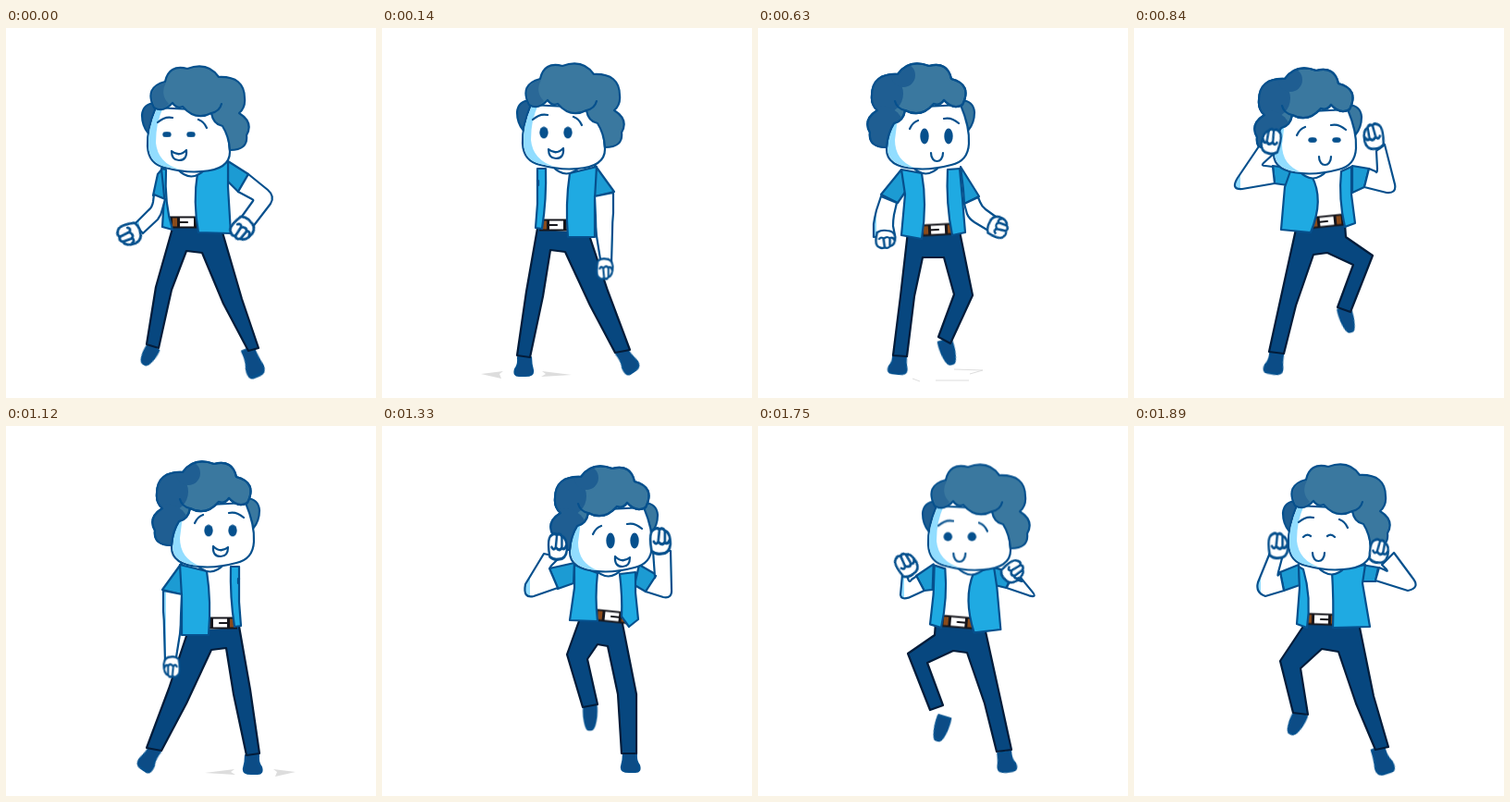
These frames come from a looping animation (400x400 px, 1960 ms). An HTML page without scripts:

```html
<!DOCTYPE html>
<html lang="en">
<head>
<meta charset="utf-8">
<title>Dancer</title>
<style>
html, body { margin: 0; width: 100%; height: 100%; overflow: hidden; background: #fff }
svg { display: block; width: 100vw; height: 100vh }
.line { fill: none; stroke: #06508d; stroke-width: 2.2; stroke-linecap: round; stroke-linejoin: round }
.ink { fill: #06508d }
.skin { fill: #fff }
.shade { fill: #92ddff }
.hair { fill: #3a789f }
.dark { fill: #1f5e92 }
.shirt { fill: #1faae2 }
.sleeve { fill: #1c9bd3 }
.trousers { fill: #07477f; stroke: #031c3a }
.shoe {
  fill: #0c4c86;
  --flat: path("M-7-1H7Q7 7 9 13Q10 19 1 19H-6Q-12 19-10 12Q-6 7-7-1Z");
  --tip: path("M-8-1H8Q9 7 7 13Q5 20 2 20H-1Q-5 20-7 13Q-9 7-8-1Z");
}
.dust { fill: #ddd }

/* One half of the dance, shown again as its mirror image. */
.half { animation: 980ms steps(1) infinite }
.full { animation: 1960ms steps(1) infinite }

.flip { animation-name: flip }
.unflip { animation-name: unflip }
.lookLeft { animation-name: lookLeft }
.lookRight { animation-name: lookRight }
@keyframes flip { 0% { transform: translate(0) scaleX(1) } 50%, to { transform: translate(420px) scaleX(-1) } }
@keyframes unflip { 0% { transform: scaleX(1) } 50%, to { transform: scaleX(-1) } }
@keyframes lookLeft { 0%, 75%, to { opacity: 1 } 25% { opacity: 0 } }
@keyframes lookRight { 0%, 75%, to { opacity: 0 } 25% { opacity: 1 } }
@keyframes litA { 0% { fill: url(#litA) } 50%, to { fill: #fff } }
@keyframes litB { 0% { fill: #fff } 50%, to { fill: url(#litB) } }

.trousers { animation-name: trousers }
@keyframes trousers {
0%, to { d: path("M181 213 162 280 152 342 165 346 179 283 195 241 212 243 235 298 262 349 273 346 255 293 232 214Z"); animation-timing-function: steps(2) }
14.285% { d: path("M169 211 156 285 146 354 160 356 174 290 182 240 198 242 225 300 252 351 268 348 244 284 223 221Z"); animation-timing-function: steps(3) }
35.714% { d: path("M161 209 145 290 145 354 161 354 165 290 176 238 187 236 198 252 187 301 203 304 220 247 206 208Z"); animation-timing-function: steps(3) }
57.142% { d: path("M152 221 143 303 146 353 161 354 162 300 169 246 196 246 191 290 182 346 198 350 210 284 212 218Z") }
64.285% { d: path("M162 220 154 290 146 354 161 355 169 290 178 248 201 248 212 288 195 334 208 341 232 289 218 220Z"); animation-timing-function: steps(3) }
85.714% { d: path("M176 213 158 295 146 350 162 352 175 300 194 245 209 243 237 256 220 302 234 307 258 246 229 226 228 212Z") }
92.857% { d: path("M177 213 161 292 145 347 159 350 180 300 199 244 217 241 240 262 232 312 248 310 262 254 234 212Z") }
}
.shoeA { animation-name: shoeA }
@keyframes shoeA {
0%, to { d: var(--tip); transform: translate(159px, 346px) rotate(30deg) scale(.85, 1); animation-timing-function: steps(2) }
14.285% { d: var(--flat); transform: translate(154px, 357px) rotate(0deg); animation-timing-function: steps(3) }
35.714% { transform: translate(152px, 355px) rotate(0deg); animation-timing-function: steps(3) }
57.142% { transform: translate(154px, 355px) rotate(0deg) scaleY(1.15) }
64.285% { transform: translate(153px, 355px) rotate(6deg); animation-timing-function: steps(3) }
85.714% { transform: translate(154px, 353px) rotate(10deg) scaleY(1.1) }
92.857% { d: var(--flat); transform: translate(156px, 350px) rotate(18deg) scaleY(1.4) }
}
.shoeB { animation-name: shoeB }
@keyframes shoeB {
0%, to { d: var(--flat); transform: translate(262px, 349px) rotate(-22deg) scale(.95, 1.5); animation-timing-function: steps(2) }
14.285% { d: var(--flat); transform: translate(259px, 350px) rotate(-34deg) scale(.9, 1.3); animation-timing-function: steps(3) }
35.714% { d: var(--tip); transform: translate(195px, 303px) rotate(0deg) scale(.85, 1.25); animation-timing-function: steps(3) }
57.142% { d: var(--flat); transform: translate(189px, 350px) rotate(0deg) scaleY(1.1) }
64.285% { d: var(--tip); transform: translate(202px, 339px) rotate(-17deg) scale(.9, 1.25); animation-timing-function: steps(3) }
85.714% { d: var(--tip); transform: translate(227px, 304px) rotate(-17deg) scale(.85, 1.25) }
92.857% { d: var(--tip); transform: translate(240px, 312px) rotate(-27deg) scale(.9, 1.15) }
}
.torso { animation-name: torso }
@keyframes torso {
0%, to { d: path("M171 150 180 216 209 216 238 148Z"); animation-timing-function: steps(2) }
14.285% { d: path("M170 150 172 218 203 220 230 150Z"); animation-timing-function: steps(3) }
35.714% { d: path("M147 155 160 205 188 208 212 152Z"); animation-timing-function: steps(3) }
57.142% { d: path("M147 152 170 222 200 222 212 152Z") }
64.285% { d: path("M156 153 176 222 212 220 220 152Z"); animation-timing-function: steps(3) }
85.714% { d: path("M170 152 190 215 226 212 236 150Z") }
92.857% { d: path("M171 150 204 212 234 214 242 150Z") }
}
.belt { animation-name: belt }
@keyframes belt {
0%, to { transform: translate(195px, 210px); animation-timing-function: steps(2) }
14.285% { transform: translate(188px, 213px); animation-timing-function: steps(3) }
35.714% { transform: translate(171px, 206px) rotate(-6deg); animation-timing-function: steps(3) }
57.142% { transform: translate(184px, 218px) }
64.285% { transform: translate(194px, 218px) rotate(-3deg); animation-timing-function: steps(3) }
85.714% { transform: translate(208px, 209px) rotate(-6deg) }
92.857% { transform: translate(217px, 209px) rotate(-2deg) }
}
.panelA { animation-name: panelA }
@keyframes panelA {
0%, to { d: path("M173 153Q171 190 180 218L169 215 171 182 168 152Z"); animation-timing-function: steps(2) }
14.285% { d: path("M177 152Q178 185 173 217L166 216 168 190 168 152Z"); animation-timing-function: steps(3) }
35.714% { d: path("M163 160Q160 185 161 206L153 217 143 209 146 180 146 158Z"); animation-timing-function: steps(3) }
57.142% { d: path("M167 155Q169 195 173 228L147 228 147 195 146 152Z") }
64.285% { d: path("M177 157Q183 190 177 228L155 224 159 180 155 153Z"); animation-timing-function: steps(3) }
85.714% { d: path("M192 160Q206 185 191 221L159 218 163 172 170 152Z") }
92.857% { d: path("M206 157Q204 190 205 218L165 217 173 170 170 150Z") }
}
.panelB { animation-name: panelB }
@keyframes panelB {
0%, to { d: path("M207 157Q202 188 208 221L243 222 240 172 240 144Z"); animation-timing-function: steps(2) }
14.285% { d: path("M203 157Q198 190 201 226L230 226 230 185 232 150Z"); animation-timing-function: steps(3) }
35.714% { d: path("M187 159Q190 185 187 211L217 210 212 175 212 150Z"); animation-timing-function: steps(3) }
57.142% { d: path("M195 152Q194 190 198 224L216 222 214 195 211 152Z") }
64.285% { d: path("M205 153Q203 190 210 224L224 221 221 185 218 152Z"); animation-timing-function: steps(3) }
85.714% { d: path("M224 155Q221 185 228 215L239 211 235 180 235 150Z") }
92.857% { d: path("M237 155Q228 185 233 218L244 214 241 175 242 152Z") }
}
.sleeveA { animation-name: sleeveA }
@keyframes sleeveA {
0%, to { d: path("M170 151 164 158 159 181 172 185Z"); animation-timing-function: steps(2) }
14.285% { d: path("M170 155 168 165 169 180 170 185Z"); animation-timing-function: steps(3) }
35.714% { d: path("M142 150 123 161 135 179 147 172Z"); animation-timing-function: steps(3) }
57.142% { d: path("M146 150 133 190 146 195 147 170Z") }
64.285% { d: path("M155 153 133 180 151 189 160 176Z"); animation-timing-function: steps(3) }
85.714% { d: path("M172 152 150 149 152 168 166 170Z") }
92.857% { d: path("M174 150 156 153 159 168 173 168Z") }
}
.sleeveB { animation-name: sleeveB }
@keyframes sleeveB {
0%, to { d: path("M240 144 262 158 251 177 240 166Z"); animation-timing-function: steps(2) }
14.285% { d: path("M230 148 251 177 230 182 229 160Z"); animation-timing-function: steps(3) }
35.714% { d: path("M212 148 239 154 230 176 213 170Z"); animation-timing-function: steps(3) }
57.142% { d: path("M212 152 231 188 217 196 214 170Z") }
64.285% { d: path("M219 150 239 182 223 190 222 175Z"); animation-timing-function: steps(3) }
85.714% { d: path("M236 149 254 152 249 172 236 178Z") }
92.857% { d: path("M242 150 262 158 258 178 241 172Z") }
}
.armA { animation: armA 980ms steps(1) infinite, litA 1960ms steps(1) infinite }
@keyframes armA {
0%, to { d: path("M160 180L159 188Q158 194 154 197L139 212 148 222 164 207Q168 202 169 196L172 185Z"); animation-timing-function: steps(2) }
14.285% { d: path("M169 165L169 167Q169 168 169 169L169 170 169 170 169 169Q169 168 169 167L169 166Z"); animation-timing-function: steps(3) }
35.714% { d: path("M124 162L125 164Q125 165 125 163L127 135 108 135 107 176Q106 187 116 185L135 179Z") }
42.857% { d: path("M125 165L121 166Q119 166 117 164L107 154 93 162 104 178Q108 187 116 186L135 182Z"); animation-timing-function: steps(2) }
57.142% { d: path("M134 191L133 206Q132 222 131 236L129 256 144 252 145 230Q145 214 145 208L146 196Z") }
64.285% { d: path("M133 182L128 197Q126 205 125 212L125 226 148 224 146 214Q146 208 147 202L150 189Z"); animation-timing-function: steps(3) }
85.714% { d: path("M150 150L142 149Q137 149 140 146L152 135 135 128 112 162Q104 175 117 174L152 168Z") }
92.857% { d: path("M155 153L148 156Q145 158 147 155L152 150 139 137 119 164Q110 175 124 178L159 167Z") }
}
.armB { animation: armB 980ms steps(1) infinite, litB 1960ms steps(1) infinite }
@keyframes armB {
0%, to { d: path("M262 158L283 175Q291 182 286 190L266 216 254 205 267 187Q268 186 266 185L251 177Z"); animation-timing-function: steps(2) }
14.285% { d: path("M250 178L250 200Q249 210 249 220L248 255 236 250 232 225Q231 215 231 205L230 182Z"); animation-timing-function: steps(3) }
35.714% { d: path("M239 154L239 154Q238 153 237 151L228 142 245 138 265 171Q268 187 256 184L230 175Z"); animation-timing-function: steps(3) }
57.142% { d: path("M231 189L234 205Q235 215 235 222L232 252 216 250 219 226Q219 218 218 210L217 196Z") }
64.285% { d: path("M238 183L240 188Q242 193 246 196L257 204 249 219 234 210Q228 206 226 201L223 190Z"); animation-timing-function: steps(3) }
85.714% { d: path("M254 152L261 155Q263 158 263 152L262 133 271 126 282 169Q284 179 273 178L249 172Z") }
92.857% { d: path("M262 158L264 161Q265 163 264 158L260 143 273 137 286 169Q289 180 278 184L258 178Z") }
}
.fistA { animation-name: fistA }
@keyframes fistA {
0%, to { transform: translate(134px, 223px) rotate(70deg) scale(1.25); animation-timing-function: steps(2) }
14.285% { transform: translate(169px, 180px) rotate(90deg) scale(0); animation-timing-function: steps(3) }
35.714% { transform: translate(119px, 125px) rotate(180deg) scale(1.2, 1.45) }
42.857% { transform: translate(98px, 151px) rotate(130deg) scale(1.1); animation-timing-function: steps(2) }
57.142% { transform: translate(137px, 263px) rotate(0deg) scale(1, 1.15) }
64.285% { transform: translate(138px, 228px) rotate(0deg) scale(1.15, 1); animation-timing-function: steps(3) }
85.714% { transform: translate(148px, 123px) rotate(190deg) scale(1.1, 1.4) }
92.857% { transform: translate(155px, 136px) rotate(170deg) scale(1.1, 1.3) }
}
.fistB { animation-name: fistB }
@keyframes fistB {
0%, to { transform: translate(256px, 217px) rotate(40deg) scale(1.25); animation-timing-function: steps(2) }
14.285% { transform: translate(241px, 260px) rotate(0deg) scale(.95, 1.15); animation-timing-function: steps(3) }
35.714% { transform: translate(230px, 131px) rotate(-180deg) scale(1.1, 1.45); animation-timing-function: steps(3) }
57.142% { transform: translate(223px, 259px) rotate(0deg) scale(1, 1.15) }
64.285% { transform: translate(259px, 215px) rotate(-70deg) scale(1.2, 1.1); animation-timing-function: steps(3) }
85.714% { transform: translate(259px, 118px) rotate(-190deg) scale(1.15, 1.4) }
92.857% { transform: translate(264px, 130px) rotate(-180deg) scale(1.15, 1.4) }
}
.head { animation-name: head }
@keyframes head {
0%, to { transform: translate(200px, 110px); animation-timing-function: steps(2) }
14.285% { transform: translate(199px, 107px); animation-timing-function: steps(3) }
35.714% { transform: translate(175px, 112px); animation-timing-function: steps(3) }
57.142% { transform: translate(179px, 106px) }
64.285% { transform: translate(181px, 107px); animation-timing-function: steps(3) }
85.714% { transform: translate(193px, 112px) }
92.857% { transform: translate(206px, 110px) }
}
.features { animation-name: features }
@keyframes features {
0%, to { transform: translate(-13px, 5px); animation-timing-function: steps(2) }
14.285% { transform: translate(-11px, 6px); animation-timing-function: steps(3) }
35.714% { transform: translate(-15px, 12px); animation-timing-function: steps(3) }
57.142% { transform: translate(-6px, 6px) }
64.285% { transform: translate(12px, 10px); animation-timing-function: steps(3) }
85.714% { transform: translate(13px, 9px) }
92.857% { transform: translate(14px, 9px) }
}
.brows { animation-name: brows }
@keyframes brows {
0%, 14.285%, to { transform: translateY(-1px); animation-timing-function: steps(3) }
35.714% { transform: translateY(6px); animation-timing-function: steps(3) }
57.142% { transform: translateY(0) }
64.285% { transform: translateY(3px); animation-timing-function: steps(3) }
85.714% { transform: translateY(5px) }
92.857% { transform: translateY(1px) }
}
.eyes { animation-name: eyes }
@keyframes eyes {
0%, to { transform: scaleY(.38); animation-timing-function: steps(2) }
14.285% { transform: scaleY(.75); animation-timing-function: steps(3) }
35.714% { transform: scaleY(1) }
64.285% { transform: scaleY(1); animation-timing-function: steps(3) }
85.714% { transform: scaleY(.36) }
92.857% { transform: scaleY(0) }
}
.lids { animation-name: lids }
.grin { animation-name: grin }
.smile { animation-name: smile }
.landing { animation-name: landing }
.touch { animation-name: touch }
.slide { animation-name: slide }
@keyframes lids { 0%, to { opacity: 0 } 92.857% { opacity: 1 } }
@keyframes grin { 0%, to { opacity: 1 } 42.857% { opacity: 0 } }
@keyframes smile { 0%, to { opacity: 0 } 42.857% { opacity: 1 } }
@keyframes landing { 0%, 28.571%, to { opacity: 0 } 7.142% { opacity: 1 } }
@keyframes touch { 0%, 64.285%, to { opacity: 0 } 57.142% { opacity: 1 } }
@keyframes slide { 0%, 78.571%, to { opacity: 0 } 64.285% { opacity: 1 } }
</style>
</head>
<body>
<svg viewBox="0 0 400 400">
<defs>
  <linearGradient id="litA"><stop offset=".14" stop-color="#92ddff"/><stop offset=".14" stop-color="#fff"/></linearGradient>
  <linearGradient id="litB" x1="1" x2="0" href="#litA"/>
  <g id="fist">
    <path d="M-8-7Q-11 7-6 9Q-3 11-1 9Q2 11 4 8Q9 7 9-2Q8-9 1-9Q-4-10-8-7Z"/>
    <path d="M-6 0Q-4-3-2 0L-1 8M-2 0Q2-4 4 0L4 8M4-1Q7-2 8 1"/>
  </g>
  <path id="face" d="M-38-24Q-48 0-47 18Q-46 37-28 41Q-5 47 12 45Q42 43 42 24L38-20Z"/>
  <path id="curls" d="M-40-24Q-51-46-28-52Q-24-71-4-66Q18-74 30-57Q58-58 58-34Q59-24 52-18Q68-8 60 6Q62 22 42 22Q41 7 34-4Q24-6 22-18Q5-9-9-25Q-15-22-20-29Q-30-18-40-24Z"/>
  <path id="tuft" d="M-39-29Q-52-28-53-16Q-53-4-46 4Q-44-10-37-22Z"/>
  <path id="brows" d="M-36-7Q-28-14-20-12M8-10Q14-8 17-1"/>
  <clipPath id="curlsClip"><use href="#curls" transform="scale(-1 1)"/></clipPath>
</defs>

<g class="full flip">
  <path class="half dust landing" d="M205 375 173 371 177 374 172 377ZM131 371 107 374 129 379 127 374Z"/>
  <path class="half dust touch" d="M245 373 210 364V374Z"/>
  <path class="half slide" d="M167 379 175 382M192 381H228M212 369 243 370 229 374" fill="none" stroke="#ddd"/>
  <g class="line">
    <path class="half shoe shoeA"/>
    <path class="half shoe shoeB"/>
    <path class="half trousers"/>
    <path class="half skin torso" stroke="none"/>
    <g class="half belt">
      <path d="M-18-6.5H18V6.5H-18Z" fill="#16161c" stroke="none"/>
      <path d="M-15-4.5H-10V4.5H-15ZM11-4.5H16V4.5H11Z" fill="#8a4b1b" stroke="none"/>
      <path class="skin" d="M-7-4.5H8V4.5H-7Z" stroke="none"/>
      <path d="M-7 0H1" stroke="#16161c"/>
    </g>
    <path class="half sleeve sleeveA"/>
    <path class="half sleeve sleeveB"/>
    <path class="half shirt panelA"/>
    <path class="half shirt panelB"/>

    <g class="half head">
      <path class="skin" d="M-15 42Q0 59 16 42"/>
      <g class="full unflip">
        <g class="full lookLeft">
          <use href="#tuft" class="dark"/>
          <use href="#face" class="skin"/>
          <path class="shade" stroke="none" d="M-37-23Q-47 0-46 18Q-45 36-28 40L-12 43Q-36 36-38 14Q-38-8-30-24Z"/>
          <use href="#curls" class="hair"/>
          <path class="dark" stroke="none" d="M-39-25Q-49-45-27-51Q-34-38-24-28Q-31-20-39-25Z" opacity=".6"/>
          <path d="M22-18Q31-20 33-28"/>
          <use href="#brows" class="half brows"/>
        </g>
        <g class="full lookRight">
          <use href="#tuft" class="hair" transform="scale(-1 1)"/>
          <use href="#face" class="skin" transform="scale(-1 1)"/>
          <path class="shade" stroke="none" d="M-37-15-41 24Q-40 42-12 44Q-33 36-33 14L-30-10Z"/>
          <use href="#curls" class="hair" transform="scale(-1 1)"/>
          <g clip-path="url(#curlsClip)" class="dark" stroke="none">
            <circle cx="-46" cy="-36" r="22"/><circle cx="-48" cy="2" r="25"/><circle cx="-24" cy="-56" r="13"/>
          </g>
          <use href="#curls" transform="scale(-1 1)"/>
          <path d="M-22-18Q-31-20-33-28"/>
          <g class="half brows"><use href="#brows" transform="scale(-1 1)"/></g>
        </g>
      </g>
      <g class="half features">
        <g class="half ink eyes" stroke="none"><ellipse cx="-13" rx="4.7" ry="8.5"/><ellipse cx="13" rx="4.7" ry="8.5"/></g>
        <path class="half lids" d="M-17 1Q-13-3-9 0M9 0Q13-3 17 1"/>
        <path class="half skin grin" d="M-8 18Q0 25 8 17Q9 28 0 28Q-8 28-8 18Z"/>
        <path class="half smile" d="M-6 18C-6 30 7 30 7 18"/>
      </g>
    </g>

    <path class="armA"/>
    <path class="armB"/>
    <use href="#fist" class="half skin fistA"/>
    <use href="#fist" class="half skin fistB"/>
  </g>
</g>
</svg>
</body>
</html>
```
